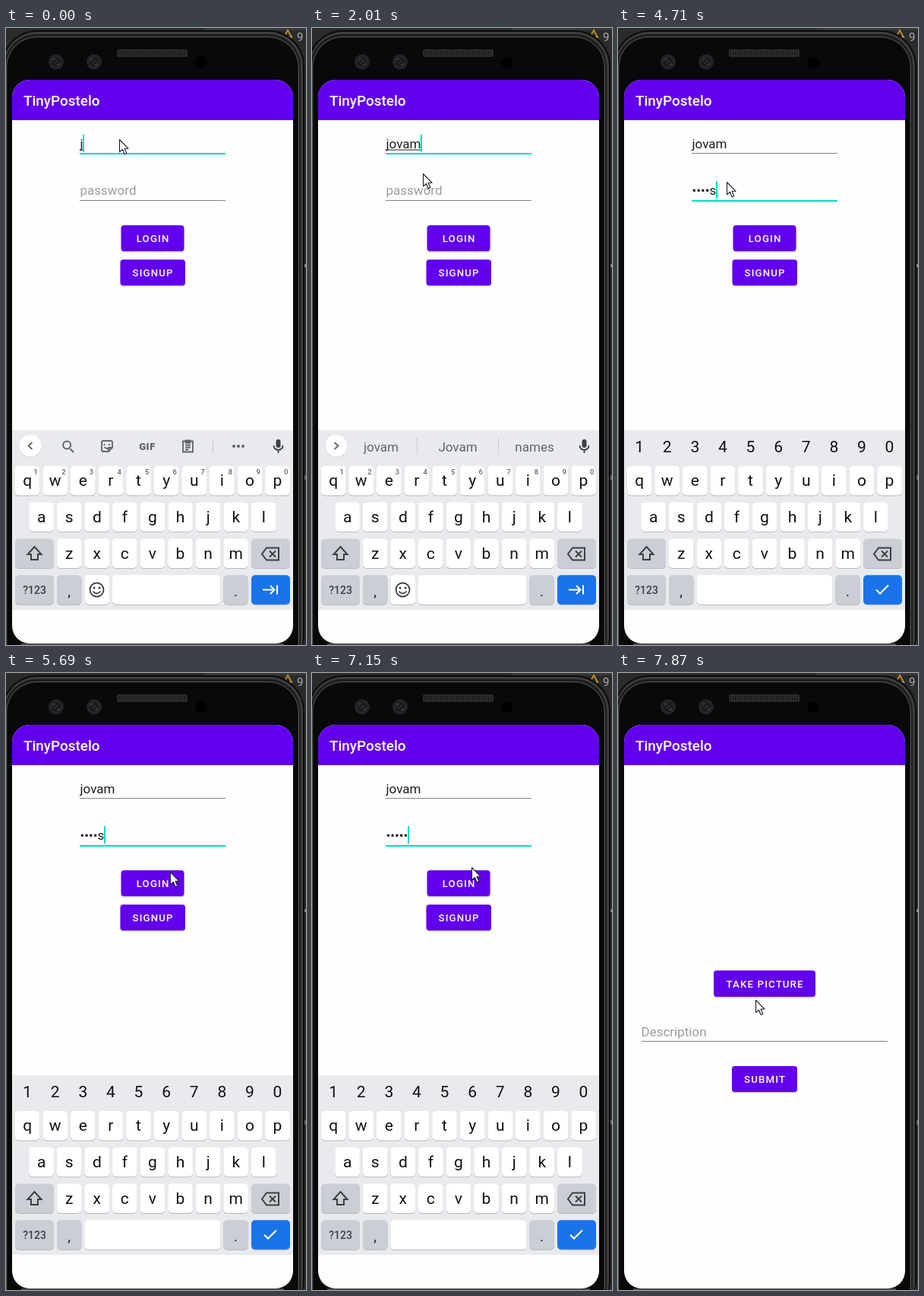
An HTML page with a canvas for the animation above (7.99 s loop, 395 px wide and 810 px high).

```html
<!DOCTYPE html>
<html lang="en">
<head>
<meta charset="utf-8">
<title>Login demo</title>
<style>
html, body { margin: 0; width: 100%; height: 100%; overflow: hidden; background: #2b2b2b; }
canvas { display: block; width: 395px; height: 810px; }
</style>
</head>
<body>
<canvas id="stage" width="395" height="810"></canvas>
<script>
const LOOP = 7990;
const PURPLE = '#6200ee', TEAL = '#03dac5', GREY = '#5f6368', INK = '#1b1b1d';
const APP = 'TinyPostelo', USER = 'jovam', SECRET = 'kamos';

const stage = document.getElementById('stage');
const main = stage.getContext('2d');
const layer = document.createElement('canvas');
layer.width = 395;
layer.height = 810;
let c = main;

// Each entry: start time, then the values held from there on
const POINTER = [
  [0, 149, 146], [1330, 150, 150], [1460, 150, 160], [1600, 148, 175], [1730, 147, 186],
  [2010, 146, 191], [2130, 145, 197], [2270, 143, 202],
  [5270, 160, 212], [5400, 185, 232], [5550, 207, 252], [5690, 216, 261],
  [6120, 216, 264], [6400, 214, 261], [6520, 211, 257], [6650, 210, 255],
  [7450, 208, 275], [7590, 198, 340], [7720, 186, 410], [7870, 181, 429]
];
const USER_LEN = [[0, 1], [120, 2], [400, 3], [800, 4], [1050, 5]];
const HINTS = [
  [0], [120, 'jo', 'Jo', 'job'], [400, 'jov', 'Jo', 'job'], [520, 'jov', 'Jovam', 'games'],
  [920, 'jova', 'Jovam', 'names'], [1050, 'jovam', 'Jovam', 'names']
];
// Typed count and whether the last letter still shows
const SECRET_LEN = [
  [0, 0, 0], [3290, 1, 1], [3410, 2, 1], [4000, 2, 0], [4150, 3, 1],
  [4460, 4, 1], [4710, 5, 1], [6120, 5, 0]
];
const CARET = [[0, 1], [1600, 0], [2010, 1], [2860, 0], [3290, 1], [5270, 0], [5690, 1], [6400, 0], [6780, 1]];
const FOCUS_SWITCH = 2410, OPEN = 7300;

const at = (list, t) => list.filter(e => e[0] <= t).pop().slice(1);

function rect(x, y, w, h, color) {
  c.fillStyle = color;
  c.fillRect(x, y, w, h);
}
function round(x, y, w, h, r, color) {
  c.fillStyle = color;
  c.beginPath();
  c.roundRect(x, y, w, h, r);
  c.fill();
}
function disc(x, y, r, color) {
  c.fillStyle = color;
  c.beginPath();
  c.arc(x, y, r, 0, 7);
  c.fill();
}
function text(s, x, y, size, color, align = 'left', weight = 400, spacing = 0) {
  c.font = `${weight} ${size}px Roboto, sans-serif`;
  c.letterSpacing = spacing + 'px';
  c.textAlign = align;
  c.fillStyle = color;
  c.fillText(s, x, y);
  return c.measureText(s).width;
}
function icon(d, x, y, color = GREY, width = 1.8) {
  c.save();
  c.translate(x, y);
  c.strokeStyle = color;
  c.lineWidth = width;
  c.stroke(new Path2D(d));
  c.restore();
}

function drawPhone() {
  rect(0, 0, 395, 810, '#2b2b2b');
  rect(262, 0, 133, 3, '#36383a');
  icon('M0-5L5 4H-5Z', 371, 8, '#b98a2c', 2);
  text('9', 383, 17, 15, '#a9adb0');
  rect(393, 310, 2, 4, '#888');
  rect(393, 587, 2, 6, '#666');
  round(-6, 3, 399, 840, 47, '#0b0b0b');
  round(-4, 5, 395, 840, 45, '#3d3d3d');
  round(-2, 8, 390, 840, 42, '#1c1c1c');
  c.strokeStyle = '#555';
  c.lineWidth = 1;
  c.beginPath();
  c.roundRect(0.5, 11.5, 385, 840, 40);
  c.stroke();
  round(2, 13, 382, 840, 38, '#090909');
  round(146, 28, 93, 10, 2, '#2b2b2b');
  for (let x = 148; x < 238; x += 3) rect(x, 30, 1, 6, '#181818');
  for (const x of [66, 116]) {
    disc(x, 44.5, 10, '#232426');
    disc(x, 44.5, 6, '#191a1d');
    icon('M-4-1V-4H-1M4 1V4H1M-2 2L2-2', x, 44.5, '#4b4d52', 1);
  }
  disc(257, 45, 7.5, '#000');
  rect(20, 808, 346, 2, '#4a4a4a');
}

function button(label, x, y, w, h) {
  round(x, y + 1.5, w, h, 4, 'rgba(0,0,0,.2)');
  round(x, y, w, h, 4, PURPLE);
  text(label, 193.6, y + h / 2 + 4.8, 13.2, '#fff', 'center', 500, 1.18);
}

function field(x, w, y, focused) {
  if (focused) rect(x, y, w, 2, TEAL);
  else rect(x, y, w, 1, '#858585');
}

function appBar() {
  rect(8, 68, 370, 740, '#fefefe');
  rect(8, 68, 370, 53, PURPLE);
  text(APP, 23, 102, 18.9, '#fff', 'left', 500);
}

function loginPage(t) {
  appBar();
  const inUser = t < FOCUS_SWITCH;
  const name = USER.slice(0, at(USER_LEN, t)[0]);
  const [count, shown] = at(SECRET_LEN, t);
  const secret = '•'.repeat(count - shown) + (shown ? SECRET[count - 1] : '');
  const nameW = text(name, 97.5, 158, 17, INK);
  let secretW = 0;
  if (secret) secretW = text(secret, 97.5, 219, 17, INK);
  else text('password', 97.5, 219, 17, '#9c9c9c');
  if (inUser) rect(97.5, 159.5, nameW, 1, INK);
  field(97, 192, 164, inUser);
  field(97, 192, 226, !inUser);
  if (at(CARET, t)[0]) {
    if (inUser) rect(97 + nameW, 140, 2, 23, TEAL);
    else rect(97.3 + secretW, 201, 2, 23, TEAL);
  }
  button('LOGIN', 151.5, 259, 83, 34);
  button('SIGNUP', 150.5, 304, 85.5, 34);
}

function postPage() {
  appBar();
  button('TAKE PICTURE', 126, 390.5, 134, 34.5);
  text('Description', 30.5, 476.5, 17, '#9c9c9c');
  field(31, 324, 483, false);
  button('SUBMIT', 150, 516, 86, 34);
}

function key(x, y, w, color = '#fff') {
  round(x, y + 1, w, 38.5, 5, '#b4b7bc');
  round(x, y, w, 38.5, 5, color);
}

function letters(row, x0, y, digits) {
  [...row].forEach((ch, i) => {
    const x = x0 + i * 36.6;
    key(x, y, 32.6);
    text(ch, x + 16.3, y + 26, 21, '#111', 'center');
    if (digits) text((i + 1) % 10, x + 27.5, y + 11, 9.5, GREY, 'center', 500);
  });
}

function toolbar() {
  icon('M3.5 3.5L8 8M4.2-1.5A5 5 0 1 1-5.8-1.5A5 5 0 1 1 4.2-1.5', 81, 549, GREY, 2);
  icon('M-5-7H5Q7-7 7-5V2L2 7H-5Q-7 7-7 5V-5Q-7-7-5-7M7 2H4Q2 2 2 4V7M-3.5 1Q0 5 3 1M-3.5-3V-1M3-3V-1', 133, 549);
  text('GIF', 186, 553.5, 13, GREY, 'center', 900, 0.6);
  icon('M-6.5-6H6.5V8H-6.5ZM-3-7H3V-4H-3ZM-3.5-1H3.5M-3.5 2H3.5M-3.5 5H1', 239.5, 548.5);
  rect(272, 539, 1, 20, '#c8cacf');
  for (const x of [300, 306, 312]) disc(x, 549, 2, GREY);
}

function strip(t) {
  const hints = at(HINTS, t);
  disc(32, 549.5, 14.5, '#d8dadd');
  disc(32, 548.5, 14.3, '#fff');
  icon(hints.length ? 'M-2.5-4.5L2.5 0L-2.5 4.5' : 'M2.5-4.5L-2.5 0L2.5 4.5', 32, 548.5);
  round(355.5, 540, 6, 11, 3, '#3c4043');
  icon('M-6-1A6 6 0 0 0 6-1M0 5V9', 358.5, 549, '#3c4043');
  if (!hints.length) return toolbar();
  hints.forEach((s, i) => text(s, 91 + i * 101, 555.5, 17, GREY, 'center'));
  rect(138, 538, 1, 22, '#c8cacf');
  rect(245, 538, 1, 22, '#c8cacf');
}

function keyboard(t) {
  const plain = t >= FOCUS_SWITCH, dull = '#cbced5';
  rect(8, 528, 370, 236, '#e8eaed');
  if (plain) [...'1234567890'].forEach((d, i) => text(d, 28.1 + i * 36.6, 557, 21, '#111', 'center'));
  else strip(t);
  letters('qwertyuiop', 11.8, 575, !plain);
  letters('asdfghjkl', 30.3, 622.8);
  letters('zxcvbnm', 66.8, 670.5);
  key(12, 670.5, 51, dull);
  icon('M0-9L9 1H4.5V8H-4.5V1H-9Z', 37.5, 690, '#3c4043', 2);
  key(323, 670.5, 51, dull);
  icon('M-5-8H11V8H-5L-11 0ZM-1-4L7 4M7-4L-1 4', 348, 690.5, '#3c4043', 2);
  key(12, 718.3, 51, dull);
  text('?123', 37.5, 743, 14, '#3c4043', 'center', 500);
  key(67, 718.3, 32.4, dull);
  text(',', 83, 746, 19, '#222', 'center');
  if (plain) {
    key(103.4, 718.3, 179);
  } else {
    key(103.4, 718.3, 32.6);
    icon('M9 0A9 9 0 1 1-9 0A9 9 0 1 1 9 0M-5 2Q0 8 5 2', 119.5, 737.5, '#3c4043', 1.8);
    disc(116, 735, 1.5, '#3c4043');
    disc(123, 735, 1.5, '#3c4043');
    key(140, 718.3, 142.4);
  }
  key(286.3, 718.3, 32.6, dull);
  text('.', 302.6, 746, 19, '#222', 'center');
  key(323, 718.3, 51, '#1a73e8');
  icon(plain ? 'M-8 0L-3 5L8-6' : 'M-10 0H5M0-5.5L5.5 0L0 5.5M9-6V6', 348, 737.5, '#fff', 2);
}

function zoomed(scale, draw) {
  c.save();
  c.translate(193, 438);
  c.scale(scale, scale);
  c.translate(-193, -438);
  draw();
  c.restore();
}

function opening(t) {
  const late = t >= 7450;
  zoomed(late ? 1.05 : 1.03, () => loginPage(t));
  c = layer.getContext('2d');
  c.clearRect(0, 0, 395, 810);
  zoomed(late ? 0.993 : 0.946, postPage);
  c = main;
  c.globalAlpha = late ? 1 : 0.65;
  c.drawImage(layer, 0, 0);
  c.globalAlpha = 1;
}

function pointer([x, y]) {
  c.save();
  c.translate(x + 0.5, y + 0.5);
  const p = new Path2D('M0 0V16.3L3.9 12.8L6.6 19.2L9.3 18L6.5 11.8H11.6Z');
  c.fillStyle = '#fff';
  c.strokeStyle = '#1c1c2b';
  c.lineWidth = 1.1;
  c.lineJoin = 'round';
  c.fill(p);
  c.stroke(p);
  c.restore();
}

function draw(t) {
  drawPhone();
  c.save();
  c.beginPath();
  c.roundRect(8, 68, 370, 740, 23);
  c.clip();
  if (t < OPEN) {
    loginPage(t);
    keyboard(t);
  } else if (t < 7590) {
    opening(t);
  } else {
    postPage();
  }
  c.restore();
  pointer(at(POINTER, t));
}

const start = performance.now();
function tick() {
  draw((performance.now() - start) % LOOP);
  requestAnimationFrame(tick);
}
tick();
</script>
</body>
</html>
```
